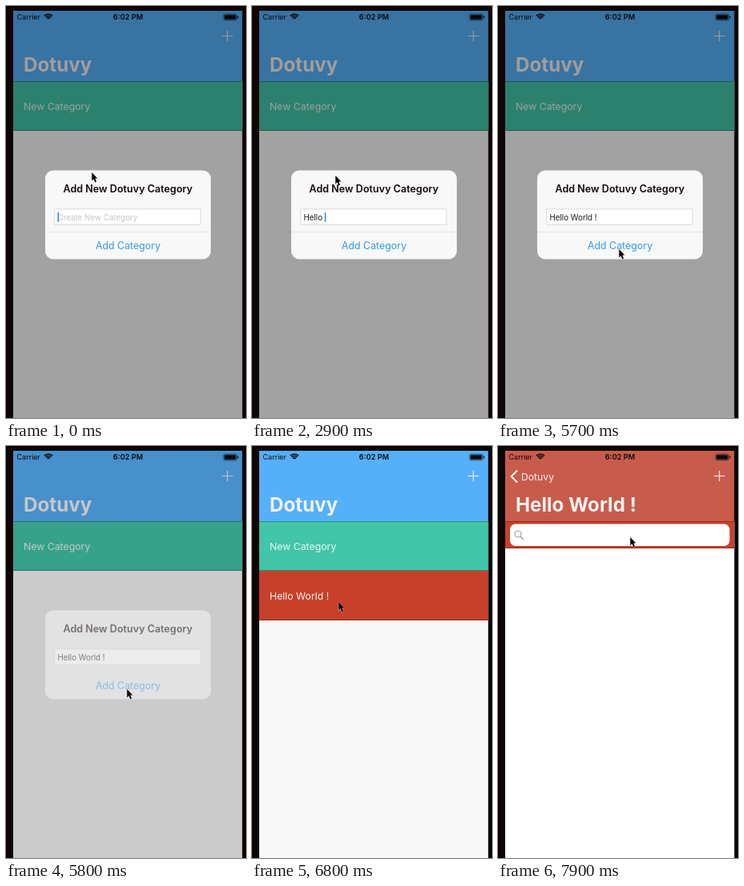
An HTML page with a canvas for the animation above (8000 ms loop, 300 by 515 pixels).

```html
<!DOCTYPE html>
<html lang="en">
<head>
<meta charset="utf-8">
<title>Add category</title>
<style>
html, body { margin: 0; width: 300px; height: 515px; overflow: hidden; background: #0e0605; }
canvas { display: block; width: 300px; height: 515px; }
</style>
</head>
<body>
<canvas id="stage"></canvas>
<script>
const APP = 'Dotuvy', ITEM = 'Hello World !';
const LOOP = 8000, SELECT = 6850, PUSH = 6950;
const LEFT = 9, TOP = 6, WIDTH = 286.5, NAV_END = 94;
const KEYS = [1400, 1800, 2100, 2300, 2600, 2900, 3100, 3300, 3500, 3700, 4000, 4600, 4900];
const BLUE = [86, 176, 249], GREY = [154, 137, 134], RED = [200, 92, 76];
const HAIRLINE = 'rgba(0,0,0,.3)';
// time, x, y of the pointer tip
const PATH = [
  [0, 107, 208], [900, 104, 212], [5050, 104, 212], [5600, 151, 304],
  [6100, 151, 304], [6700, 108, 195], [7120, 108, 195], [7750, 165, 114]
];

const canvas = document.getElementById('stage');
const ctx = canvas.getContext('2d');
const dpr = window.devicePixelRatio || 1;
canvas.width = 300 * dpr;
canvas.height = 515 * dpr;

const clamp = v => Math.max(0, Math.min(1, v));
const lerp = (a, b, k) => a + (b - a) * k;
const smooth = k => k * k * (3 - 2 * k);
const mix = (a, b, k) => `rgb(${a.map((v, i) => Math.round(lerp(v, b[i], k)))})`;

function rect(x, y, w, h, color, radius = 0) {
  ctx.fillStyle = color;
  ctx.beginPath();
  ctx.roundRect(x, y, w, h, radius);
  ctx.fill();
}

function line(points, color, width) {
  ctx.strokeStyle = color;
  ctx.lineWidth = width;
  ctx.beginPath();
  points.forEach(([x, y]) => ctx.lineTo(x, y));
  ctx.stroke();
}

function text(str, x, y, size, color, { weight = 400, align = 'left', alpha = 1 } = {}) {
  ctx.save();
  ctx.globalAlpha *= alpha;
  ctx.font = `${weight} ${size}px Inter, sans-serif`;
  ctx.textAlign = align;
  ctx.fillStyle = color;
  ctx.fillText(str, x, y);
  ctx.restore();
}

function statusBar() {
  const ink = '#0c0a10';
  text('Carrier', 13.5, 17, 9, ink);
  text('6:02 PM', 152.5, 17, 9.2, ink, { weight: 600, align: 'center' });
  ctx.strokeStyle = ink;
  ctx.lineWidth = 1.5;
  for (const r of [2.5, 5, 7.3]) {
    ctx.beginPath();
    ctx.arc(53, 17.5, r, -Math.PI * 0.75, -Math.PI * 0.25);
    ctx.stroke();
  }
  ctx.lineWidth = 0.6;
  ctx.beginPath();
  ctx.roundRect(271.8, 10.2, 16.8, 7.6, 2);
  ctx.stroke();
  rect(273, 11.2, 14.4, 5.6, ink, 1);
  rect(289.3, 12.5, 1.2, 3, ink, 0.5);
}

function navBar(p) {
  const color = p < 0.73 ? mix(BLUE, GREY, p / 0.73) : mix(GREY, RED, (p - 0.73) / 0.27);
  const white = '#f5f1f0';
  rect(LEFT, TOP, WIDTH, NAV_END - TOP, color);
  statusBar();
  line([[270, 37.5], [283.5, 37.5]], white, 1.1);
  line([[276.7, 30.8], [276.7, 44.2]], white, 1.1);

  // The large title shrinks into the back button
  const x = lerp(22, 29, p), y = lerp(82, 43, p), size = lerp(24.2, 12.2, p);
  text(APP, x, y, size, white, { weight: 700, alpha: clamp(1 - 3 * p) });
  text(APP, x, y, size, white, { alpha: clamp(3 * p) });
  if (p > 0) {
    text(ITEM, 22 + (1 - p) * 324, 82, 24.2, white, { weight: 700 });
    ctx.globalAlpha = clamp((p - 0.8) / 0.2);
    line([[24, 30.5], [16.8, 38], [24, 45.5]], white, 2.2);
    ctx.globalAlpha = 1;
  }
}

function row(x, y, label, color, ink, alpha) {
  rect(x, y, WIDTH, 62, color);
  rect(x, y + 61, WIDTH, 1, HAIRLINE);
  text(label, x + 13, y + 35.5, 12.3, ink, { alpha });
}

function categories(t, p) {
  const x = LEFT - 86 * p, ink = '#eef6f3', fade = 1 - 0.5 * p;
  rect(LEFT, NAV_END, WIDTH, 421, mix([248, 248, 248], [228, 221, 219], p));
  row(x, NAV_END, 'New Category', '#42c5a8', ink, fade);
  if (t >= SELECT) row(x, 156, ITEM, '#e0d2d1', '#e6dad9', fade);
  else if (t >= 6000) row(x, 156, ITEM, '#c8402b', ink, fade);
}

function items(p) {
  const x = LEFT + (1 - p) * WIDTH;
  const shade = ctx.createLinearGradient(x - 6, 0, x, 0);
  shade.addColorStop(0, 'rgba(0,0,0,0)');
  shade.addColorStop(1, `rgba(0,0,0,${0.3 * (1 - p)})`);
  rect(x - 6, NAV_END, 6, 421, shade);
  rect(x, NAV_END, WIDTH, 421, '#fff');
  rect(x, NAV_END, WIDTH, 34, '#c8402b');
  rect(x, 127, WIDTH, 1, HAIRLINE);
  rect(x + 6, 97.5, WIDTH - 12, 27.5, '#fff', 7);
  ctx.strokeStyle = '#a79a9a';
  ctx.lineWidth = 1.2;
  ctx.beginPath();
  ctx.arc(x + 16, 110, 4, 0, 7);
  ctx.stroke();
  line([[x + 19, 113], [x + 23, 117]], '#a79a9a', 1.4);
}

function dialog(t) {
  rect(49, 205.5, 207, 111, '#f8f8f8', 10);
  text(`Add New ${APP} Category`, 152.3, 233, 12.6, '#120608', { weight: 600, align: 'center' });
  rect(60.5, 253.5, 183, 20, '#cfcfcf');
  rect(61.2, 254.2, 181.6, 18.6, '#fff');

  const size = 9.8;
  const count = KEYS.filter(k => k <= t).length;
  const typed = ITEM.slice(0, count);
  if (count) text(typed, 64.5, 267.5, size, '#1c1418');
  else text('Create New Category', 64.5, 267.5, size, '#cbc3c6');
  if ((t - (KEYS[count - 1] || 0)) % 1000 < 500) {
    ctx.font = `400 ${size}px Inter, sans-serif`;
    rect(64.5 + ctx.measureText(typed).width, 258, 1.5, 12, '#3a86cc');
  }

  rect(49, 282, 207, 0.6, '#d4d4d4');
  text('Add Category', 152.5, 304.3, 12.4, '#369ae6', { align: 'center' });
}

function pointer(t) {
  const next = PATH.findIndex(k => k[0] > t);
  const b = PATH[next < 0 ? PATH.length - 1 : next];
  const a = next < 0 ? b : PATH[next - 1];
  const k = a === b ? 0 : smooth((t - a[0]) / (b[0] - a[0]));
  ctx.save();
  ctx.translate(lerp(a[1], b[1], k), lerp(a[2], b[2], k));
  const arrow = new Path2D('M0.3 0V10.5L2.6 8.3L4.4 12.4L6.1 11.6L4.4 7.6H7.4Z');
  ctx.strokeStyle = 'rgba(255,255,255,.7)';
  ctx.lineWidth = 1;
  ctx.stroke(arrow);
  ctx.fillStyle = '#0d0507';
  ctx.fill(arrow);
  ctx.restore();
}

function draw(now) {
  const t = now % LOOP;
  const phase = Math.max(0, t - PUSH) * 0.0173;
  const p = 1 - (1 + phase) * Math.exp(-phase);
  const modal = 1 - clamp((t - 5700) / 210);

  ctx.setTransform(dpr, 0, 0, dpr, 0, 0);
  rect(0, 0, 300, 515, '#0e0605');
  ctx.save();
  ctx.beginPath();
  ctx.rect(LEFT, TOP, WIDTH, 509);
  ctx.clip();
  categories(t, p);
  if (p > 0) items(p);
  navBar(p);
  rect(LEFT, NAV_END, WIDTH, 1, HAIRLINE);
  if (modal > 0) {
    rect(LEFT, TOP, WIDTH, 509, `rgba(0,0,0,${0.35 * modal})`);
    ctx.globalAlpha = modal;
    dialog(t);
    ctx.globalAlpha = 1;
  }
  ctx.restore();
  pointer(t);
}

function tick() {
  draw(performance.now());
  requestAnimationFrame(tick);
}
tick();
</script>
</body>
</html>
```
